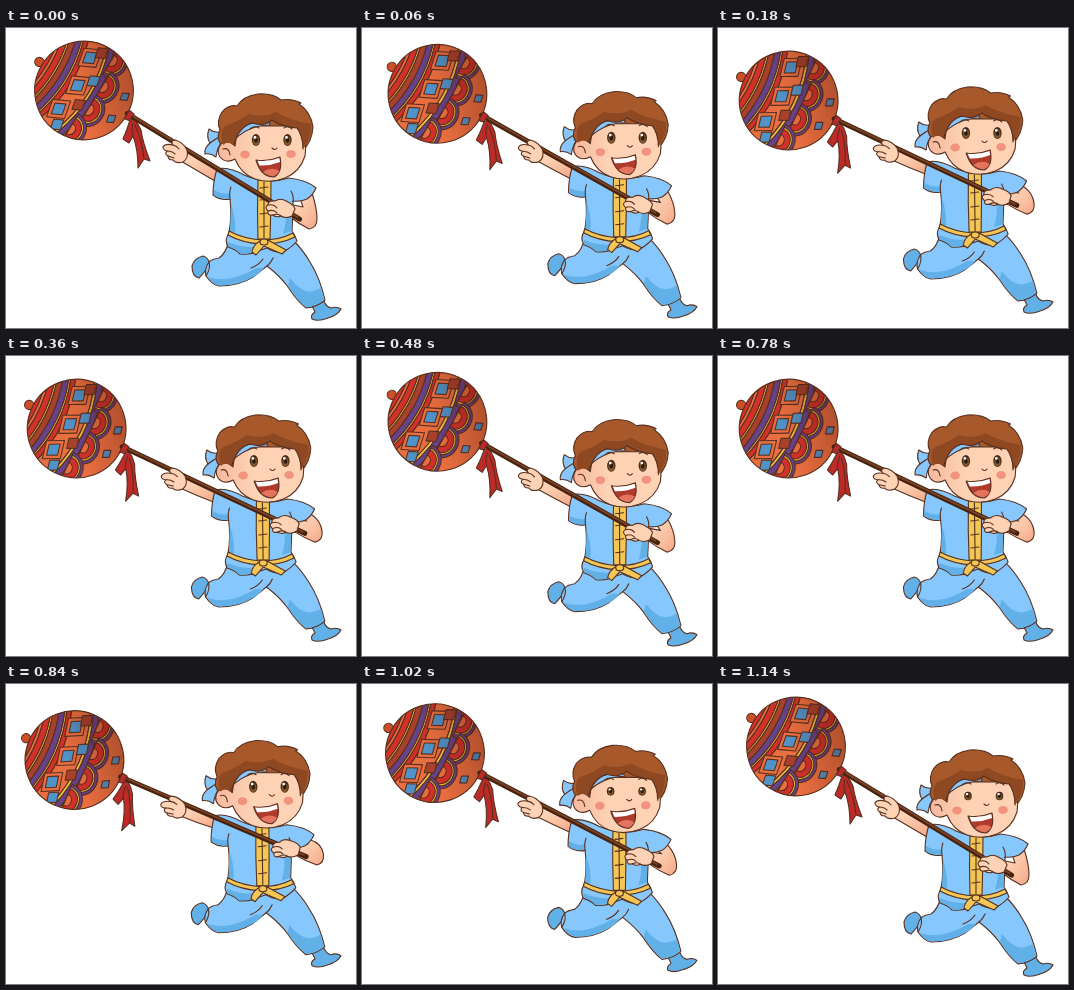
Animation of 350 by 300 pixels, one loop 1200 ms. Source, as an HTML page:

```html
<!DOCTYPE html>
<html lang="en">
<head>
<meta charset="utf-8">
<title>Running boy</title>
<style>
html, body { margin: 0; width: 100%; height: 100%; overflow: hidden; background: #fff; }
svg { display: block; width: 350px; height: 300px; }
.o { stroke: #57301f; stroke-width: 1.1; stroke-linejoin: round; stroke-linecap: round; }
.line { fill: none; }
.skin { fill: #fdd2b5; }
.cloth { fill: #86c7fd; }
.shade { fill: #62b0e8; }
.gold { fill: #f3c655; }
.hair { fill: #a8592b; }
.dark { fill: #8e4822; }
.red { fill: #bd2a28; }
</style>
</head>
<body>
<svg viewBox="0 0 350 300">
  <defs>
    <clipPath id="round"><circle r="49.3"/></clipPath>
    <linearGradient id="dusk" x1="0" y1="1" x2="1" y2="0">
      <stop offset=".45" stop-color="#401008" stop-opacity="0"/>
      <stop offset="1" stop-color="#401008" stop-opacity=".45"/>
    </linearGradient>
    <linearGradient id="blush"><stop offset="0" stop-color="#f8b89d"/><stop offset=".4" stop-color="#fdd2b5"/></linearGradient>
    <linearGradient id="elbow" y2="1"><stop offset=".3" stop-color="#fdd2b5"/><stop offset="1" stop-color="#f4a888"/></linearGradient>
  </defs>

  <path id="armL" class="o" fill="url(#elbow)"/>
  <path id="armR" class="o" fill="url(#elbow)"/>

  <g class="body">
    <!-- shoes and legs -->
    <path class="o shade" d="M197 228Q188 230 186 238Q186 249 193 250Q198 245 204 236Q202 229 197 228Z"/>
    <path class="o shade" d="M306 278L318 273Q320 279 325 280Q331 278 335 281Q332 287 322 290Q312 294 306 291Q304 287 309 284Z"/>
    <path class="o cloth" d="M223 213Q220 225 213 230Q206 231 203 234Q198 241 200 248Q206 257 213 258Q233 258 247 249L261 238Q274 248 282 259Q291 273 300 280Q311 279 319 272Q314 250 304 234Q297 222 287 212Z"/>
    <path class="shade" d="M202 249Q219 254 233 248Q244 244 250 240L258 240Q252 247 247 249Q232 258 213 257.4Q206 256 202 249ZM284 250Q296 266 307 263Q311 262 315 260L318.4 272Q310 278.5 300 279.3Q291 272 282 258Z"/>
    <path class="o line" d="M261 238Q265 235 267 230M203 234Q205 240 200 248M245 240Q253 237 257 231"/>

    <!-- shirt -->
    <path class="o cloth" d="M238 147Q222 138 211 141Q207 153 207 167Q215 173 224 171Q226 188 223 205Q218 212 222 219Q229 221 234 226Q245 227 252 223L261 220Q270 226 279 223Q287 218 291 213Q289 207 286 203Q287 188 287 173Q294 174 301 171Q307 167 310 160Q301 152 283 150Q261 157 238 147Z"/>
    <path class="shade" d="M208 162Q216 167 224 165L224 170.5Q215 172 208 167ZM225 176Q230 191 229 204L224 204ZM279 173L286 176L285.5 203L277 206Q282 190 279 173ZM222 214Q239 221 252 218L251 222Q240 227 234 225.5Q229 220 222 218Z"/>
    <path class="o line" d="M224 171Q223 164 225 159M287 174Q288 168 285 163"/>
    <path class="o gold" d="M252 152L265 152Q265 182 264 211L252 211Q251 181 252 152Z"/>
    <path class="o line" d="M258 154V210M254 160L262 159M254 172L262 171M254 186L262 185M254 199L262 198"/>
    <path class="o gold" d="M223 203Q238 211 256 212Q274 212 287 205L289 209Q275 216 256 216Q236 215 222 207Z"/>
    <path class="o gold" d="M254 213Q247 217 246 224L250 227L258 218L276 226L280 222L262 212Z"/>
    <ellipse class="o gold" cx="258" cy="214" rx="4" ry="3"/>
  </g>

  <g id="tassel">
    <path class="o red" d="M124 92Q121 102 117 111L123 115L127 108Q132 121 132 140L138 131L144 133Q137 115 135 102Q132 95 128 91Z"/>
    <path class="o line" d="M127 95Q125 104 127 108M129 97Q136 112 138 130"/>
  </g>

  <g id="club">
    <g transform="translate(78 62.5) rotate(31.5)">
      <circle class="o" cx="-53" cy="-1" r="4.6" fill="#cd4f28"/>
      <g id="ball" clip-path="url(#round)"></g>
      <circle class="o line" r="49.3"/>
      <path d="M49 -3H251" stroke="#47230f" stroke-width="5" stroke-linecap="round"/>
      <path d="M53 -3.6H249" stroke="#7b4326" stroke-width="1.8"/>
      <path class="o red" d="M49 -7L55 -6L54 2L49 3Z"/>
    </g>
    <path class="o skin" d="M181 122Q177 114 169 112Q164 113 167 117Q159 115 157 119Q157 122 161 123Q158 126 162 128Q162 132 167 132Q170 136 177 134Q183 130 181 122Z"/>
    <path class="o line" d="M167 117Q171 118 173 121M161 123Q166 123 169 126M162 128L168 130"/>
    <path class="o skin" d="M286 188Q280 191 275 188Q270 190 267 187Q261 188 262 183Q258 179 262 177Q262 172 269 173Q275 169 282 174Q288 177 289 181Z"/>
    <path class="o line" d="M262 177Q268 176 271 180M262 183Q268 181 271 185M267 187Q272 185 275 188"/>
  </g>

  <g class="body">
    <!-- headband tails -->
    <path class="o cloth" d="M218 102Q211 107 203 101Q200 109 204 115Q198 120 199 126Q205 125 210 129Q211 119 217 113Z"/>
    <path class="o line" d="M217 107Q209 111 204 115"/>
    <!-- head -->
    <path class="o hair" d="M217 118Q209 112 214 102Q210 93 216 84Q223 76 231 78Q237 68 252 66Q267 65 275 72Q286 70 295 75L293 76Q305 84 307 99Q306 114 297 122L230 122Z"/>
    <path class="o" fill="url(#blush)" d="M229 118Q222 111 215 116Q210 123 214 129Q220 136 229 131Q235 146 249 151Q264 156 279 150Q294 144 299 128Q301 114 297 98L232 98Z"/>
    <path class="o line" d="M217 121Q223 119 224 127"/>
    <path class="o cloth" d="M228 100L262 91L264 97Q244 97 229 111Z"/>
    <path class="hair" d="M217 117Q212 100 222 88L245 76L285 76L304 91Q305 112 297 121Q297 108 291 100Q276 99 266 92Q258 99 246 95Q233 99 228 116Q221 113 217 117Z"/>
    <path class="dark" d="M217 116Q213 104 219 98Q232 94 243 86Q258 90 270 84Q283 92 305 96Q305 112 297 120Q297 108 291 100Q276 99 266 92Q258 99 246 95Q233 99 228 116Q221 113 217 116Z"/>
    <path class="o line" d="M228 116Q233 99 246 95Q258 99 266 92Q276 99 291 100Q297 108 297 121"/>
    <path class="o line" d="M244 101Q248 97 253 100M278 100Q282 97 286 101"/>
    <g id="eyes"></g>
    <ellipse cx="239" cy="126.5" rx="4.8" ry="4" fill="#f29380"/>
    <ellipse cx="285" cy="126" rx="4.8" ry="4" fill="#f29380"/>
    <path class="o line" d="M266 120Q269 123 271 120"/>
    <path class="o" d="M250 132Q262 134 274 129Q277 144 268 149Q255 149 250 132Z" fill="#b03a2b"/>
    <path d="M251.5 132.7Q263 134 273.3 130L274 134Q264 138 253.5 137.5Z" fill="#fff"/>
    <path d="M257 144Q265 138 273.5 143Q271 147 268 148.3Q261 148 257 144Z" fill="#e5745f"/>
  </g>
</svg>
<script>
const NS = "http://www.w3.org/2000/svg";
const $ = s => document.querySelector(s);
const add = (parent, tag, attrs) => {
  const el = document.createElementNS(NS, tag);
  for (const key in attrs) el.setAttribute(key, attrs[key]);
  return parent.appendChild(el);
};

// ball: curved bands across the stick axis, tiles between them, fans near the stick
const ball = $("#ball");
const BULGE = 9;
const ORANGE = "#ea6f40", RED = "#d4302a", GOLD = "#f0c040", PURPLE = "#66428a", BLUE = "#4f93c8", RUST = "#a8402c";
const band = (a, b, fill) => add(ball, "path", {
  class: "o", fill,
  d: `M${a} -50Q${a + 2 * BULGE} 0 ${a} 50L${b} 50Q${b + 2 * BULGE} 0 ${b} -50Z`
});
const tile = (u, v, size, fill) => add(ball, "rect", {
  class: "o", fill, x: -size / 2, y: -size / 2, width: size, height: size,
  transform: `translate(${u} ${v}) rotate(-26) skewX(-14)`
});
const fan = (u, v, r, fill) => add(ball, "path", {
  class: "o", fill, d: `M${u} ${v - r}C${u + r * 1.3} ${v - r} ${u + r * 1.3} ${v + r} ${u} ${v + r}Z`
});

add(ball, "circle", { r: 50, fill: ORANGE });
[
  [-70, -54, RED], [-54, -51, ORANGE], [-51, -45, RED], [-45, -43, GOLD],
  [-43, -37, RUST], [-37, -31, PURPLE], [-31, -29, GOLD], [-29, -24, RED],
  [-24, -4, ORANGE], [-4, -1, GOLD], [-1, 5, PURPLE], [5, 70, ORANGE]
].forEach(b => band(...b));
for (let i = -1; i <= 1; i++) {
  const v = i * 30 - 1, u = -8 - Math.abs(i) * 4;
  tile(u, v, 18, ORANGE);
  tile(u, v, 11, BLUE);
}
for (let i = -2; i <= 1; i++) {
  const v = i * 28 + 15, u = 4 - v * v / 200;
  tile(u, v, 10, i % 2 ? BLUE : RUST);
}
[-40, -13, 14, 40].forEach(v => {
  const u = 14 - v * v / 250;
  [[17, PURPLE], [14, GOLD], [12, RED], [6, ORANGE]].forEach(([r, fill]) => fan(u, v, r, fill));
});
[-16, 10].forEach(v => tile(38, v, 7, BLUE));
add(ball, "circle", { r: 50, fill: "url(#dusk)" });

// eyes
const eyes = [250, 281.5].map(x => {
  const g = add($("#eyes"), "g", {});
  add(g, "ellipse", { rx: 4.2, ry: 6, fill: "#4a2c14" });
  add(g, "ellipse", { cy: 1, rx: 3, ry: 4.2, fill: "#80592c" });
  add(g, "ellipse", { rx: 1.8, ry: 2.8, fill: "#2c1a0c" });
  add(g, "circle", { cx: -1, cy: -2.6, r: 1.4, fill: "#fff" });
  return { g, x };
});

// poses: 0 is the low stride, 4 the high one
const STEPS = [0, 1, 2, 3, 4, 4, 3, 2, 1, 0];
const PIVOT = [168, 136], GRIP = [126, 91], SWING = -8.2, LEAN = .016, RISE = -9.3;

const clubAt = ([x, y], k) => {
  const a = SWING * k * Math.PI / 180, c = Math.cos(a), s = Math.sin(a);
  const dx = x - PIVOT[0], dy = y - PIVOT[1];
  return [PIVOT[0] + dx * c - dy * s, PIVOT[1] + dx * s + dy * c];
};
const bodyAt = ([x, y], k) => [x + (y - 285) * LEAN * k, y + RISE * k];
const fmt = p => p.map(n => n.toFixed(2)).join(" ");

function pose(k, squint) {
  const lean = LEAN * k;
  document.querySelectorAll(".body").forEach(g =>
    g.setAttribute("transform", `matrix(1 0 ${lean} 1 ${-285 * lean} ${RISE * k})`));
  $("#club").setAttribute("transform", `rotate(${SWING * k} ${PIVOT})`);
  const grip = clubAt(GRIP, k);
  $("#tassel").setAttribute("transform",
    `translate(${grip[0] - GRIP[0]} ${grip[1] - GRIP[1]}) rotate(${12 * k} ${GRIP})`);

  const c = (x, y) => fmt(clubAt([x, y], k)), b = (x, y) => fmt(bodyAt([x, y], k));
  $("#armL").setAttribute("d", `M${c(179, 122)}Q${c(191, 132)} ${b(211, 141)}L${b(209, 153)}Q${c(190, 142)} ${c(175, 133)}Z`);
  $("#armR").setAttribute("d", `M${c(283, 176)}L${c(297, 179)}L${b(294, 170)}L${b(306, 165)}Q${c(311, 180)} ${c(311, 191)}Q${c(311, 200)} ${c(303, 201)}Q${c(293, 196)} ${c(283, 188)}Z`);

  eyes.forEach(({ g, x }) =>
    g.setAttribute("transform", `translate(${x} 112) scale(${squint ? ".9 .72" : "1"})`));
}

const start = performance.now();
function tick() {
  const t = (performance.now() - start) % 1200;
  pose(STEPS[Math.floor(t / 60) % 10] / 4, t >= 960);
  requestAnimationFrame(tick);
}
tick();
</script>
</body>
</html>
```
